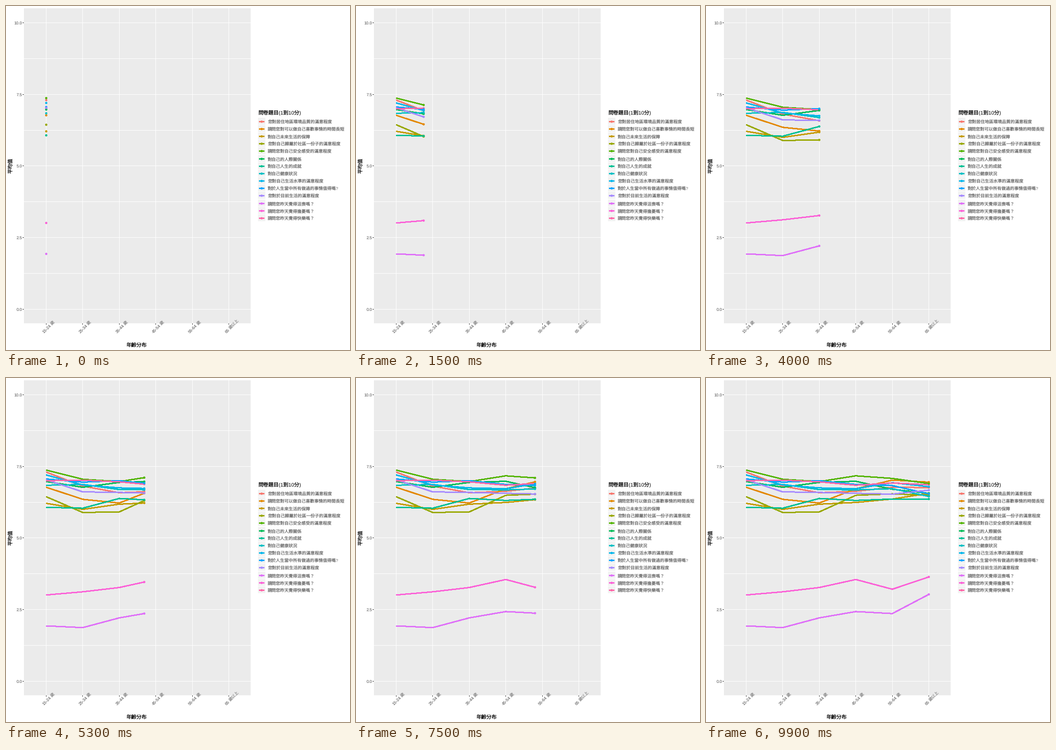
A matplotlib script that plays this animation: 748 px wide and 748 px high, repeating every 10 s.

```python
import numpy as np
import matplotlib.pyplot as plt
from matplotlib.animation import FuncAnimation
from matplotlib.patches import Circle, Rectangle

SIZE, DPI, FRAMES = 748, 100, 100
PX = 72 / DPI  # points per pixel
LEFT, TOP, RIGHT, BOTTOM = 39, 5, 532, 690
plt.rcParams["font.family"] = ["Liberation Sans", "Noto Sans CJK JP"]
plt.rcParams["text.hinting"] = "none"  # keeps fractional glyph advances

AGES = [("15-24", "歲"), ("25-34", "歲"), ("35-44", "歲"),
        ("45-54", "歲"), ("55-64", "歲"), ("65", "歲以上")]

# question, colour, mean score per age group
SERIES = [
    ("您對居住地區環境品質的滿意程度", "#F8766D", (7.30, 6.81, 6.58, 6.63, 6.77, 6.76)),
    ("請問您對可以做自己喜歡事情的時間長短", "#E38900", (6.77, 6.35, 6.22, 6.72, 7.02, 6.95)),
    ("對自己未來生活的保障", "#C49A00", (6.21, 6.00, 6.18, 6.24, 6.36, 6.56)),
    ("您對自己歸屬於社區一份子的滿意程度", "#99A800", (6.44, 5.89, 5.91, 6.49, 6.54, 6.49)),
    ("請問您對自己安全感受的滿意程度", "#53B400", (7.37, 7.05, 6.97, 7.17, 7.08, 6.90)),
    ("對自己的人際關係", "#00BC56", (6.97, 6.77, 6.94, 6.98, 6.70, 6.56)),
    ("對自己人生的成就", "#00C094", (6.07, 6.04, 6.38, 6.31, 6.36, 6.36)),
    ("對自己健康狀況", "#00BFC4", (6.84, 6.87, 6.69, 6.68, 6.72, 6.45)),
    ("您對自己生活水準的滿意程度", "#00B6EB", (7.20, 6.85, 6.75, 6.72, 6.93, 6.79)),
    ("對於人生當中所有做過的事情值得嗎?", "#06A4FF", (7.06, 6.95, 7.00, 6.87, 6.83, 6.54)),
    ("您對於目前生活的滿意程度", "#A58AFF", (7.03, 6.61, 6.59, 6.56, 6.53, 6.67)),
    ("請問您昨天覺得沮喪嗎？", "#DF70F8", (1.93, 1.87, 2.21, 2.43, 2.36, 3.03)),
    ("請問您昨天覺得擔憂嗎？", "#FB61D7", (3.01, 3.12, 3.27, 3.55, 3.21, 3.64)),
    ("請問您昨天覺得快樂嗎？", "#FF66A8", (7.00, 7.02, 6.96, 6.84, 6.92, 6.86)),
]
KNOTS = np.arange(len(AGES))
KNOT_FRAMES = [0, 20, 40, 59, 79, 99]


def x_px(k):
    return 87.5 + 79.4 * np.asarray(k)


def y_px(v):
    return 659.2 - 62.27 * np.asarray(v)


fig = plt.figure(figsize=(SIZE / DPI, SIZE / DPI), dpi=DPI, facecolor="white")
ax = fig.add_axes([0, 0, 1, 1])
ax.set_xlim(0, SIZE)
ax.set_ylim(SIZE, 0)
ax.axis("off")


def text(x, y, s, size, color, ha="left", rotation=0):
    return ax.text(x, y, s, fontsize=size * PX, color=color, ha=ha, va="baseline",
                   rotation=rotation, rotation_mode="anchor", zorder=6)


def box(x, y, w, h, color):
    ax.add_patch(Rectangle((x, y), w, h, fc=color, lw=0, antialiased=False))


def dot(x, y, color, zorder):
    return ax.add_patch(Circle((x, y), 2.5, fc=color, lw=0, zorder=zorder))


def score_line(color, zorder):
    # aliased strokes fill every touched pixel, so 2 px comes out as 3
    return ax.plot([], [], color=color, lw=2 * PX, zorder=zorder, antialiased=False,
                   solid_capstyle="butt", solid_joinstyle="round")[0]


def draw_panel():
    box(LEFT, TOP, RIGHT - LEFT, BOTTOM - TOP, "#EBEBEB")
    for v in np.arange(0, 10.1, 1.25):
        box(LEFT, np.floor(y_px(v)), RIGHT - LEFT, 1, "white")
    for v in np.arange(0, 10.1, 2.5):
        box(LEFT - 3, np.floor(y_px(v)), 3, 1, "#333333")
        text(35, y_px(v) + 3.5, f"{v:.1f}", 9, "#4D4D4D", "right")
    for k, (years, unit) in enumerate(AGES):
        x = float(x_px(k))
        box(np.floor(x), TOP, 1, BOTTOM - TOP, "white")
        box(np.floor(x), BOTTOM, 1, 3, "#333333")
        x0, y0 = x - 5.2, 712.3
        step = (25.5 if "-" in years else 12.5) * np.sqrt(0.5)
        text(x0, y0, years, 9, "#4D4D4D", rotation=45)
        text(x0 + step, y0 - step, unit, 9, "#909090", rotation=45)
    text(284.5, 741.5, "年齡分布", 11.2, "black", "center")
    text(14, 347.5, "平均值", 11.2, "black", "center", 90)


def draw_legend():
    text(548, 236.5, "問卷題目(1到10分)", 11.2, "black")
    for i, (label, color, _) in enumerate(SERIES):
        y = round(250.8 + 16.17 * i)
        box(548, y - 8, 16, 15, "#F2F2F2")
        box(550, y - 1, 12, 3, color)
        dot(556, y + 0.5, color, 4)
        text(569, y + 4.3, label, 9.33, "#6E6E6E")


draw_panel()
draw_legend()
last = len(SERIES) - 1
lines = [score_line(c, 3 + i / 100) for i, (_, c, _) in enumerate(SERIES)]
# the last question's point lies under the others
dots = [dot(0, 0, c, 4 if i == last else 4.1 + i / 100)
        for i, (_, c, _) in enumerate(SERIES)]


def update(frame):
    pos = np.interp(frame, KNOT_FRAMES, KNOTS)
    ks = np.append(KNOTS[KNOTS < pos], pos)
    xs = x_px(ks)
    for line, tip, (_, _, scores) in zip(lines, dots, SERIES):
        ys = y_px(np.interp(ks, KNOTS, scores))
        line.set_data(xs, ys)
        line.set_visible(frame > 0)
        tip.center = xs[-1], ys[-1]
    return lines + dots


anim = FuncAnimation(fig, update, frames=FRAMES, interval=100, repeat=True,
                     repeat_delay=0, init_func=lambda: update(0))
plt.show()
```
